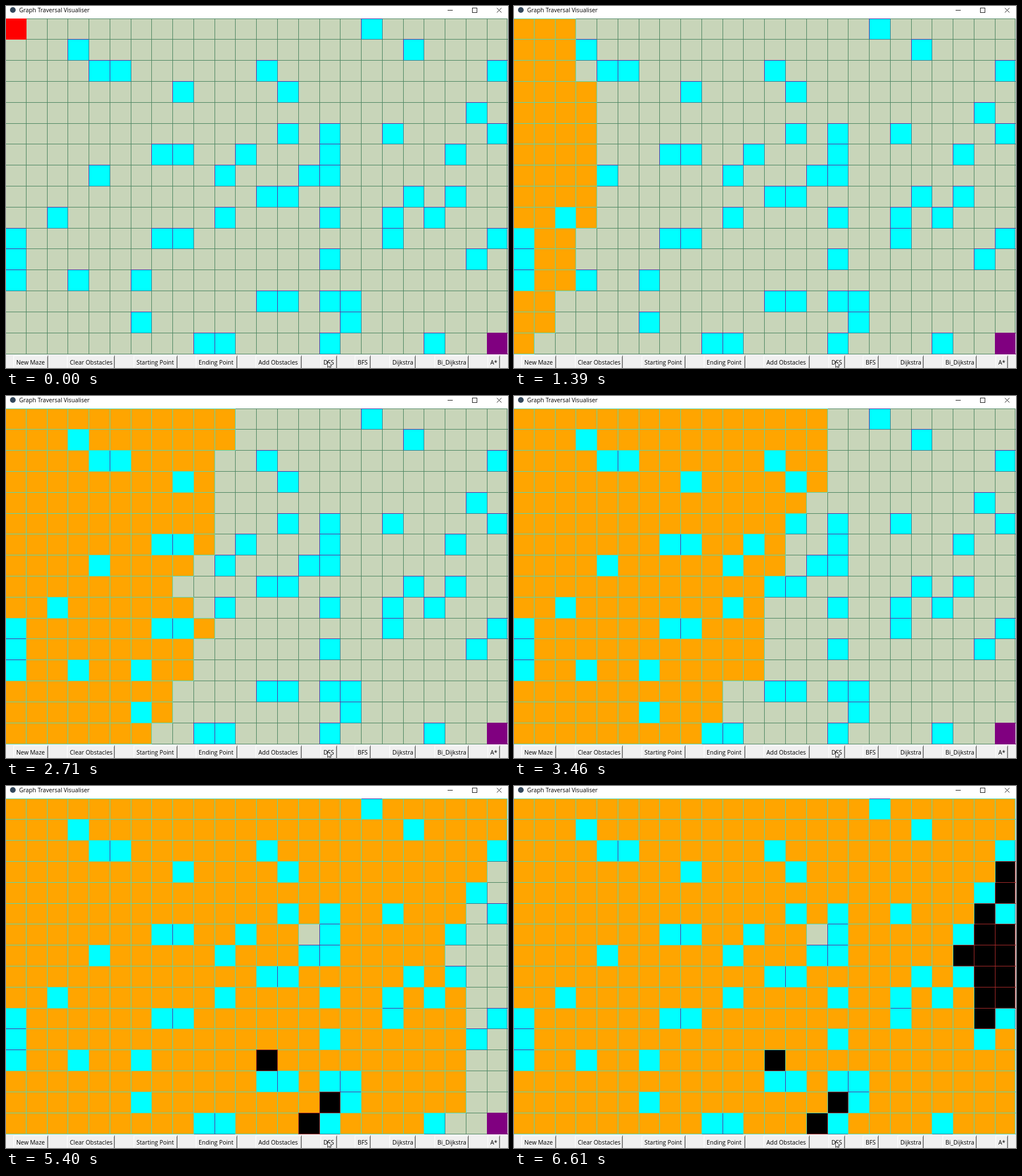
These frames come from a looping animation (881x636 px, 7070 ms). An HTML page with a canvas:

```html
<!DOCTYPE html>
<html lang="en">
<head>
<meta charset="utf-8">
<title>Graph Traversal Visualiser</title>
<style>
  html, body { margin: 0; width: 100%; height: 100%; overflow: hidden; background: #f0f0f0; }
  #stage { position: relative; width: 881px; height: 636px; overflow: hidden; }
  canvas, svg { position: absolute; left: 0; top: 0; display: block; }
  text { font: 10.4px "Open Sans", "Noto Sans", sans-serif; fill: #000; white-space: pre; }
  .press { animation: press 7070ms step-end infinite; }
  .pressed { opacity: 0; }
  @keyframes press { 0% { opacity: 0; } 6.365% { opacity: 1; } 8.911%, 100% { opacity: 0; } }
</style>
</head>
<body>
<div id="stage">
  <canvas id="board" width="881" height="636"></canvas>
  <svg id="chrome" width="881" height="636" viewBox="0 0 881 636">
    <rect width="881" height="22" fill="#fff"/>
    <circle cx="12" cy="7" r="5" fill="#33475b"/>
    <text x="23" y="11" style="font-size:10.25px">Graph Traversal Visualiser</text>
    <g fill="none" stroke="#222">
      <path d="M775 7.5h9"/>
      <rect x="818.5" y="3.5" width="8" height="8"/>
      <path d="M861.5 3.5l8 8m0-8l-8 8"/>
    </g>
    <rect y="612" width="881" height="24" fill="#f0f0f0"/>
    <g id="buttons"></g>
    <path d="M564.5 624.5v10.5l2.4-2.2 1.8 4 1.6-.8-1.7-3.7h3.2z" fill="#fff" stroke="#000" stroke-width=".8"/>
  </svg>
</div>
<script>
const LOOP = 7070, COLS = 24, ROWS = 16;
const FIRST_VISIT = 648, VISIT = 15.47;
const UNWIND = 1.304, TRACE_START = 6165, TRACE = 1.16;

// Wall columns, row by row
const walls = [
  [17], [3, 19], [4, 5, 12, 23], [8, 13], [22], [13, 15, 18, 23],
  [7, 8, 11, 15, 21], [4, 10, 14, 15], [12, 13, 19, 21], [2, 10, 15, 18, 20],
  [0, 7, 8, 18, 23], [0, 15, 22], [0, 3, 6], [12, 13, 15, 16], [6, 16], [9, 10, 15, 20]
];
const style = {
  empty:  { fill: '#c8d5b9', near: '#4f8763', far: '#4f8763' },
  wall:   { fill: '#00ffff', near: '#5a2aa0', far: '#2c7f90' },
  start:  { fill: '#ff0000', near: '#ff0000', far: '#ff0000' },
  end:    { fill: '#800080', near: '#800080', far: '#800080' },
  seen:   { fill: '#ffa500', near: '#50d8b4', far: '#50d8b4' },
  closed: { fill: '#000000', near: '#a52a2a', far: '#a52a2a' }
};

const ctx = document.getElementById('board').getContext('2d');
const lineX = c => Math.floor(36.77 * c - 1.5);
const lineY = r => Math.floor(36.815 * r + 22);

function drawCell(c, r, s) {
  const x = lineX(c), y = lineY(r);
  const w = lineX(c + 1) - x, h = lineY(r + 1) - y;
  const edge = c === COLS - 1 ? w - 1 : w;
  ctx.fillStyle = s.fill;
  ctx.fillRect(x + 1, y + 1, w - 1, h - 1);
  ctx.fillStyle = s.far;
  ctx.fillRect(x + edge, y, 1, h + 1);
  ctx.fillRect(x, y + h, w + 1, 1);
  ctx.fillStyle = s.near;
  ctx.fillRect(x, y, 1, h);
  ctx.fillRect(x, y, w, 1);
}

// Depth-first search over eight neighbours, recorded as timed paint events
const events = [], path = [], seen = new Set();
let visits = 0;
const visitTime = n => FIRST_VISIT + VISIT * n;
const paint = (time, c, r, s) => events.push({ time, c, r, s });

function isOpen(c, r) {
  return c >= 0 && r >= 0 && c < COLS && r < ROWS &&
    !walls[r].includes(c) && !seen.has(r * COLS + c);
}

function search(c, r) {
  seen.add(r * COLS + c);
  paint(visitTime(++visits), c, r, style.seen);
  let found = c === COLS - 1 && r === ROWS - 1;
  for (let dc = -1; dc <= 1 && !found; dc++) {
    for (let dr = -1; dr <= 1 && !found; dr++) {
      if (isOpen(c + dc, r + dr)) found = search(c + dc, r + dr);
    }
  }
  if (found) path.push([c, r]);
  else paint(visitTime(visits), c, r, style.closed);
  return found;
}

search(0, 0);
const foundAt = visitTime(visits);
path.forEach(([c, r], i) => paint(foundAt + UNWIND * (i + 1), c, r, style.closed));
path.forEach(([c, r], i) => paint(TRACE_START + TRACE * (i + 1), c, r, style.seen));

// The window repaints in bursts of eight
const bursts = [[630, 1290], [1390, 2050], [2170, 2810], [2890, 3560],
  [3630, 4300], [4370, 5030], [5130, 5760], [5860, 6500]];
const ticks = [0];
for (const [a, b] of bursts) {
  for (let i = 0; i < 8; i++) {
    ticks.push(a + 10 * Math.floor((b - a) * i / 70 + 0.1 * (7 - i)));
  }
}
ticks.push(6610);

function drawBoard(time) {
  for (let r = 0; r < ROWS; r++)
    for (let c = 0; c < COLS; c++) drawCell(c, r, style.empty);
  walls.forEach((row, r) => row.forEach(c => drawCell(c, r, style.wall)));
  drawCell(0, 0, style.start);
  drawCell(COLS - 1, ROWS - 1, style.end);
  for (const e of events) {
    if (e.time > time) break;
    drawCell(e.c, e.r, e.s);
  }
}

// Label, text start, right edge
const buttons = [
  ['New Maze', 18, 73], ['Clear Obstacles', 112, 190], ['Starting Point', 229, 300],
  ['Ending Point', 338, 405], ['Add Obstacles', 443, 518], ['DFS', 557, 580],
  ['BFS', 617, 639], ['Dijkstra', 678, 718], ['Bi_Dijkstra', 757, 811], ['A*', 850, 866]
];

function button(label, x, right, down) {
  const left = x - 5, shift = down ? 1 : 0;
  const light = down ? '#696969' : '#fff', dark = down ? '#fff' : '#696969';
  return `<rect x="${left}" y="614" width="${right - left + 1}" height="22" fill="#f0f0f0"/>
    <path d="M${left + .5} 636V614.5H${right}" fill="none" stroke="${light}"/>
    <path d="M${right - .5} 616V636" stroke="${down ? '#f0f0f0' : '#a0a0a0'}"/>
    <path d="M${right + .5} 614V636" stroke="${dark}"/>
    <text x="${x + shift}" y="${630 + shift}">${label}</text>`;
}

document.getElementById('buttons').innerHTML =
  buttons.map(b => button(...b, false)).join('') +
  `<g class="pressed press">${button(...buttons[5], true)}</g>`;

const pressed = document.querySelector('.pressed');
pressed.classList.remove('press');
let shown = -1;

function frame() {
  const t = performance.now() % LOOP;
  const tick = ticks.findLast(v => v <= t);
  if (tick !== shown) drawBoard(shown = tick);
  pressed.style.opacity = t >= 450 && t < 630 ? 1 : 0;
  requestAnimationFrame(frame);
}
frame();
</script>
</body>
</html>
```
